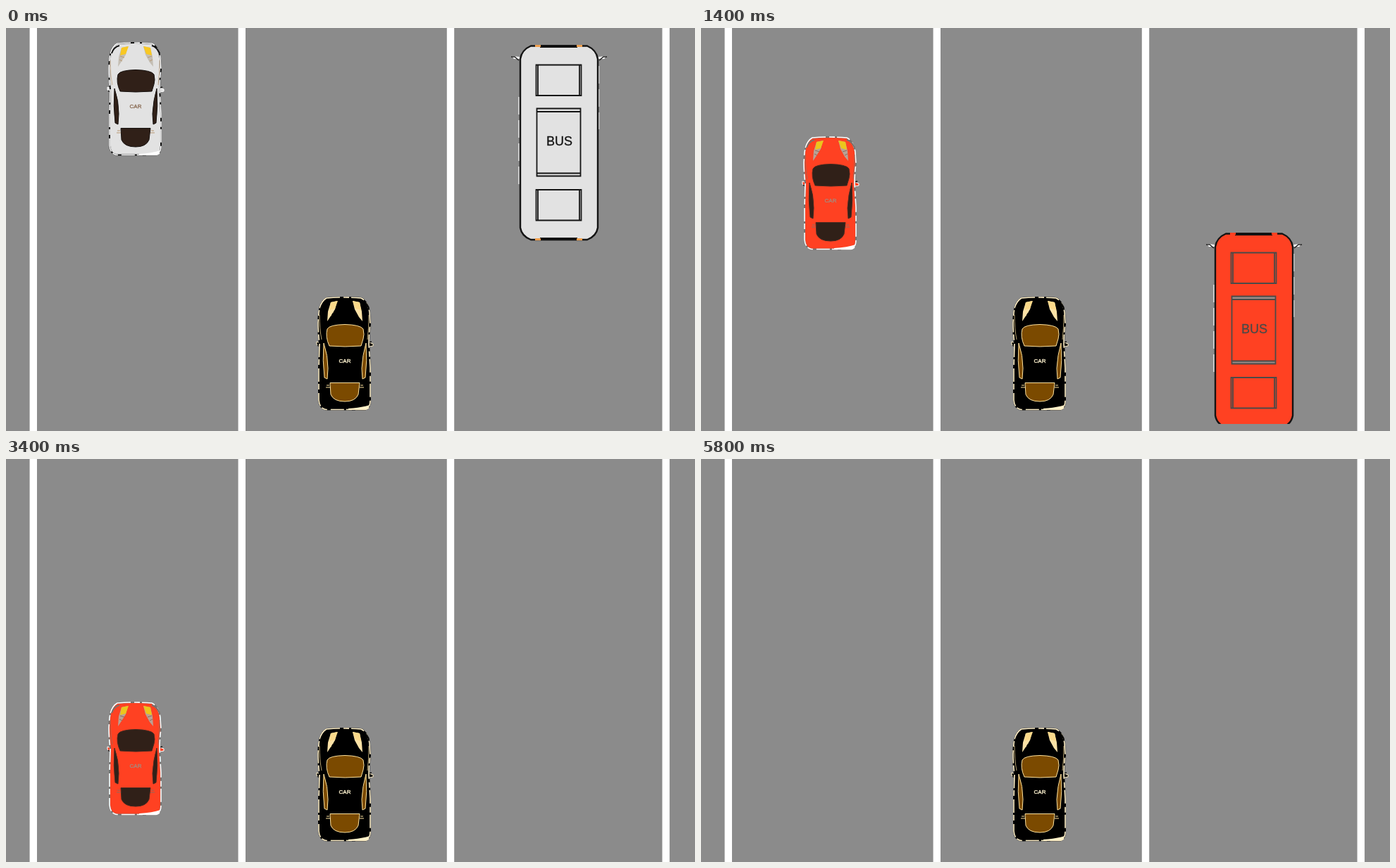
Recreate the animation shown at these times as an HTML page. Size 978 px wide and 573 px high, loop 6 s.

```html
<!DOCTYPE html>
<html lang="en">
<head>
<meta charset="utf-8">
<title>Traffic</title>
<style>
html, body { margin: 0; height: 100%; overflow: hidden; background: #8b8b8b; }
svg { display: block; }
text { font-family: "Liberation Sans", Arial, sans-serif; text-anchor: middle; }
.vehicle { --body: #e2e2e2; --line: #151515; --glass: #302018; --rim: #171210; --lamp: #f8c823;
  --streak: #c4beb4; --label: #8d7059; --edge: #111; --halo: #fff; --trim: #b99872; --tip: #f0a050; --strip: #e2e2e2; }
.near { --body: #ff4122; --line: #4b4a48; --rim: #4a2a20; --lamp: #ecc51c; --streak: #b9a195;
  --label: #a8877a; --edge: #77716e; --trim: #8d6a5c; --tip: #ff4122; --strip: #9a8c88; }
.own { --body: #000; --glass: #7b4a00; --rim: #ffe3a0; --lamp: #fbd98a; --streak: #fbe2a8;
  --label: #fff3d0; --edge: #000; --halo: #fff0c8; --trim: #ffe3a0; }
</style>
</head>
<body>
<svg width="978" height="573">
  <defs>
    <path id="shell" d="M15 1Q40-1 64 1Q74 6 76 22L77 38Q75 52 75 66L77 100V146Q77 158 70 159.5H14Q5 158 4 146V100L5 66Q3 50 3 36L4 22Q6 6 15 1Z"/>
    <g id="car">
      <path d="M6 65L1 63V67L5 70ZM75 64L81 66V69L75 70Z" fill="var(--body)" stroke="var(--halo)"/>
      <path d="M2 68L6 71M75 64L79 63" stroke="#111" stroke-width="1.5"/>
      <use href="#shell" fill="var(--body)" stroke="var(--edge)" stroke-width="2"/>
      <use href="#shell" fill="none" stroke="var(--halo)" stroke-width="1.6" stroke-dasharray="19 5 8 3"/>
      <path d="M7 15Q10 6 18 4M75 15Q71 6 64 4" fill="none" stroke="var(--edge)" stroke-width="2"/>
      <path d="M5 25Q5 45 8 60M75 25Q75 45 73 60" fill="none" stroke="var(--trim)" stroke-width=".7"/>
      <path d="M21 7L30 5L27 17L20 28L16 34L17 20ZM52 5L62 7L65 20L66 34L61 28L55 17Z" fill="var(--streak)"/>
      <path d="M21 7L31 5L27 16L19 18ZM52 5L62 7L64 18L56 16Z" fill="var(--lamp)"/>
      <path d="M19 19L25 21M18 24L22 26M64 19L58 21M65 24L61 26" stroke="var(--trim)"/>
      <g fill="var(--glass)" stroke="var(--rim)">
        <path d="M16 45Q19 39 41 38.5Q63 39 67 45Q69 53 67 59L64 69Q41 71 19 69Q13 56 16 45Z"/>
        <path d="M11 65Q17 82 17 101L16 116L12 114Q9 90 11 65ZM71 65Q66 82 65 101L66 116L70 114Q73 90 71 65Z"/>
        <path d="M20 121.5H62L60 138Q56 148 41 148Q25 148 21 138Z"/>
      </g>
      <path d="M15 125H19M14 128H20M63 125H67M62 128H68" stroke="var(--trim)" stroke-width="1.2"/>
      <path d="M46 158Q65 157 76 153L75 158L69 160H46Z" fill="var(--halo)"/>
      <text x="41" y="93" font-size="8" fill="var(--label)" stroke="var(--label)" stroke-width=".35">CAR</text>
    </g>
    <g id="bus" fill="none">
      <path d="M1 16L12 17V20L4 20ZM135 16L124 17V20L132 20Z" fill="#fff"/>
      <path d="M0 17H5L11 22M136 17H131L125 22" stroke="#222" stroke-width="1.6"/>
      <path d="M11 74V200M124.5 30V120" stroke="#eee" stroke-width="1.5" stroke-dasharray="25 8"/>
      <path d="M28 1.5H108Q121 7 123 20V260Q121 272 108 277H28Q15 272 13 260V20Q15 7 28 1.5Z" fill="var(--body)" stroke="#141414" stroke-width="2.4"/>
      <path d="M41 2H94M41 276H94" stroke="#111" stroke-width="4"/>
      <path d="M34 1.5H42M93 1.5H101M34 276.5H42M93 276.5H101" stroke="var(--tip)" stroke-width="3"/>
      <path d="M37 91H98V95H37ZM37 182H98V186H37Z" fill="var(--strip)"/>
      <g stroke="var(--line)" stroke-width="1.8">
        <path id="panel" d="M35.5 28.5H99.5V72H35.5ZM38 28V72M97 28V72"/>
        <use href="#panel" y="177.5"/>
        <path d="M36.5 90.5H98.5V186.5H36.5ZM36 95H99M36 182.5H99"/>
      </g>
      <text x="68.5" y="143" font-size="18" fill="var(--line)" stroke="var(--line)" stroke-width=".3">BUS</text>
    </g>
  </defs>
  <path d="M38.8 0V573M334.8 0V573M631 0V573M936.7 0V573" stroke="#fff" stroke-width="10.4"/>
  <svg width="978" height="563">
    <use id="slow" class="vehicle" href="#car" x="143"/>
    <use id="fast" class="vehicle" href="#bus" x="717"/>
    <use class="vehicle own" href="#car" x="440" y="383"/>
  </svg>
</svg>
<script>
const LOOP = 6000, STEP = 200, NEAR_Y = 137;
const movers = [
  { el: document.getElementById('slow'), start: 21, speed: 19.13 },
  { el: document.getElementById('fast'), start: 24, speed: 38.2 }
];

function draw() {
  const step = Math.floor(performance.now() % LOOP / STEP);
  for (const { el, start, speed } of movers) {
    const y = start + step * speed;
    el.setAttribute('y', Math.round(y));
    el.classList.toggle('near', y > NEAR_Y);
  }
  requestAnimationFrame(draw);
}
draw();
</script>
</body>
</html>
```
